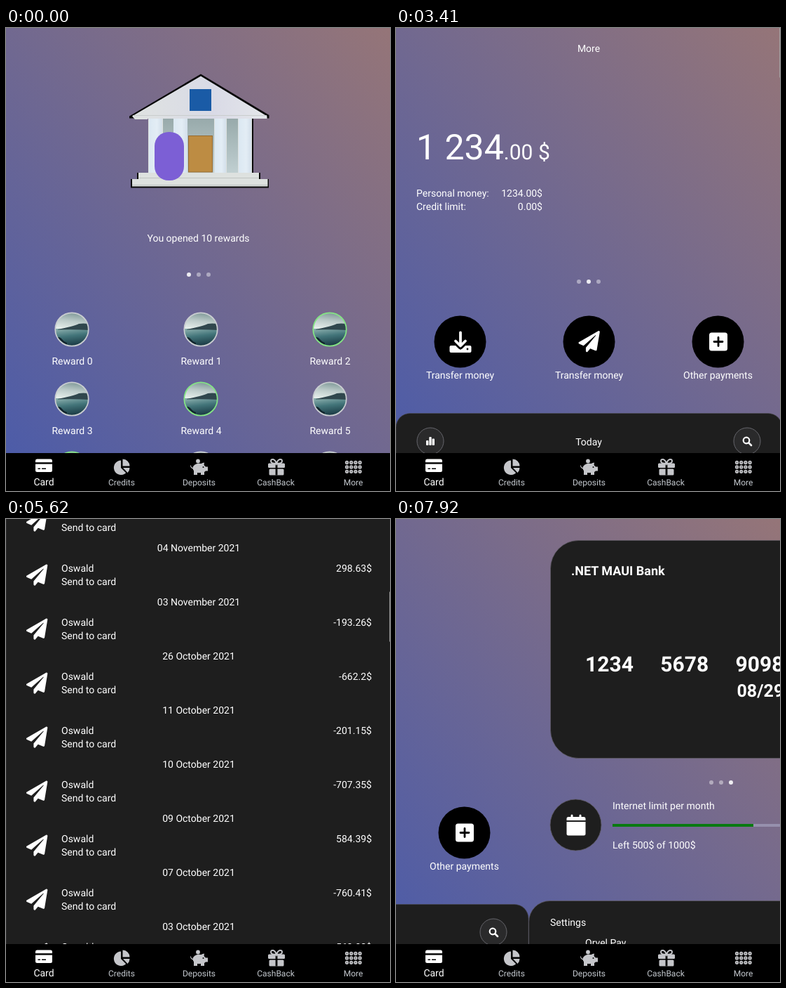
An HTML page that plays this animation: 548x659 px, repeating every 8 s.

```html
<!DOCTYPE html>
<html lang="en">
<head>
<meta charset="utf-8">
<title>Bank app</title>
<style>
  html, body { margin: 0; width: 100%; height: 100%; overflow: hidden; background: #000; }
  svg { display: block; width: 548px; height: 659px; }
  text { font: 14px Roboto, "Noto Sans", sans-serif; fill: #fff; white-space: pre; text-rendering: geometricPrecision; }
</style>
</head>
<body>
<svg id="stage" viewBox="0 0 548 659" xmlns="http://www.w3.org/2000/svg">
  <defs>
    <linearGradient id="bg" x1="0" y1="1" x2="1" y2="0">
      <stop offset="0" stop-color="#4d5ca8"/><stop offset="1" stop-color="#957578"/>
    </linearGradient>
    <linearGradient id="roof">
      <stop offset="0" stop-color="#dfe3e1"/><stop offset=".6" stop-color="#d9dae6"/><stop offset="1" stop-color="#e4e6ea"/>
    </linearGradient>
    <linearGradient id="pillar">
      <stop offset="0" stop-color="#dbe8f2"/><stop offset=".6" stop-color="#e3edf5"/><stop offset="1" stop-color="#d3dfea"/>
    </linearGradient>
    <linearGradient id="pane" x2="0" y2="1">
      <stop offset="0" stop-color="#98aaab"/><stop offset="1" stop-color="#c0cfd1"/>
    </linearGradient>
    <linearGradient id="sky" x1=".35" y1="1" x2=".6" y2="0">
      <stop offset="0" stop-color="#e6eeeb"/><stop offset=".5" stop-color="#bccbc9"/><stop offset="1" stop-color="#7d9796"/>
    </linearGradient>
    <linearGradient id="sea" x1=".35" y1="0" x2=".6" y2="1">
      <stop offset="0" stop-color="#84a9a8"/><stop offset=".4" stop-color="#43757a"/><stop offset="1" stop-color="#16343e"/>
    </linearGradient>
    <clipPath id="disc"><circle r="23.5"/></clipPath>
    <g id="photo" clip-path="url(#disc)">
      <rect x="-24" y="-24" width="48" height="24" fill="url(#sky)"/>
      <rect x="-24" y="-1" width="48" height="25" fill="url(#sea)"/>
      <path d="M-20 0Q-10-2-2-4T10-8Q16-9 24-8V1Q8 0-20 .5Z" fill="#30474d"/>
      <path d="M-24 11Q-17 10-14 14T-7 19V24H-24Z" fill="#12262d"/>
    </g>
    <path id="plane" transform="scale(.0592)" fill="#fff" d="M476 3.2L12.5 270.6c-18.1 10.4-15.8 35.6 2.2 43.2L121 358.4l287.3-253.2c5.5-4.9 13.3 2.6 8.6 8.3L176 407v80.5c0 23.6 28.5 32.9 42.5 15.8L282 426l124.6 52.2c14.2 6 30.4-2.9 33-18.2l72-432C515 7.8 493.3-6.8 476 3.2z"/>
  </defs>
  <rect width="548" height="605" fill="url(#bg)"/>
  <g id="rewards"></g>
  <g id="account"></g>
  <g id="card"></g>
  <g id="tabs"></g>
</svg>
<script>
const PAGE = 551, LOOP = 8000, DARK = '#1e1e1e';
const $ = id => document.getElementById(id);

const text = (x, y, s, attrs = '') => `<text x="${x}" y="${y}" ${attrs}>${s}</text>`;
const mid = (x, y, s, attrs = '') => text(x, y, s, 'text-anchor="middle" ' + attrs);
const right = (x, y, s) => text(x, y, s, 'text-anchor="end"');
const size = (px, weight = 400) => `style="font-size:${px}px;font-weight:${weight}"`;
const rect = (x, y, w, h, fill, rx = 0, attrs = '') =>
  `<rect x="${x}" y="${y}" width="${w}" height="${h}" rx="${rx}" fill="${fill}" ${attrs}/>`;
const circle = (x, y, r, fill, attrs = '') => `<circle cx="${x}" cy="${y}" r="${r}" fill="${fill}" ${attrs}/>`;
const path = (d, fill, attrs = '') => `<path d="${d}" fill="${fill}" ${attrs}/>`;
const use = (id, x, y) => `<use href="#${id}" transform="translate(${x} ${y})"/>`;
const dots = (y, active) => [0, 1, 2].map(i =>
  circle(261 + i * 14, y, 3, '#fff', `opacity="${i === active ? .88 : .43}"`)).join('');

function building() {
  const stone = '#dde1df', ink = '#080808';
  const fills = (list, fill) => list.map(([x, w]) => rect(x, 129, w, 77, fill)).join('');
  return rect(203, 128, 150, 79, ink) + rect(203, 128, 148, 79, stone)
    + fills([[224, 15], [259, 38], [315, 16]], 'url(#pane)')
    + fills([[204, 19], [239, 20], [298, 16], [332, 18]], 'url(#pillar)')
    + rect(260.5, 153.5, 34, 51.5, '#bd8c43', 0, 'stroke="#966a30"')
    + rect(187, 206, 176, 10, ink) + rect(189, 206, 172, 9, stone)
    + rect(178, 215, 197, 12.5, ink) + rect(180, 215, 193.5, 10.5, stone)
    + path('M189 213.5H361M180 223.500H373', 'none', 'stroke="#c0c6c4"')
    + path('M176 128.500V125.500L278 65.500L375.500 124V128.500Z', ink)
    + path('M278 68.500L372.500 125.500V129H202V130H184L180 125.500Z', 'url(#roof)')
    + path('M181 124.500H372', 'none', 'stroke="#c9cdcd"')
    + rect(262, 87, 31, 31, '#1a5ba6')
    + rect(212, 148, 42, 69, '#7c5fd5', 20);
}

function rewards() {
  const opened = [2, 4, 6, 9, 10, 11, 13, 16, 18, 19, 21];
  let out = building() + mid(274.5, 304, 'You opened 10 rewards') + dots(351, 0);
  for (let i = 0; i < 24; i++) {
    const x = 94 + i % 3 * 184, y = 429 + Math.floor(i / 3) * 99;
    const ring = opened.includes(i) ? '#84e484' : '#c9cdd0';
    out += use('photo', x, y) + circle(x, y, 23.7, 'none', `stroke="${ring}" stroke-width="1.8"`)
      + mid(x + .5, y + 50, 'Reward ' + i);
  }
  return out;
}

const history = [
  ['25 November', '-270.98'], ['22 November', '-793.47'], ['20 November', '-981.88'],
  ['06 November', '408.57'], ['04 November', '298.63'], ['03 November', '-193.26'],
  ['26 October', '-662.2'], ['11 October', '-201.15'], ['10 October', '-707.35'],
  ['09 October', '584.39'], ['07 October', '-760.41'], ['03 October', '-569.08', '190.41'],
  ['01 October', '633.91'], ['21 September', '783.39'], ['12 September', '890.24']
];

function payments() {
  let y = 633, out = '';
  for (const [day, ...sums] of history) {
    out += mid(275, y, day + ' 2021');
    y += 29;
    for (const sum of sums) {
      out += use('plane', 29, y - 10.5) + text(79, y, 'Oswald') + text(79, y + 19, 'Send to card') + right(522, y, sum + '$');
      y += 58;
    }
    y -= 10;
  }
  return out;
}

function account() {
  const ring = 'stroke="#66666c"';
  const button = (x, label, icon) => circle(x, 446.5, 37, '#000') + icon + mid(x, 499, label);
  const tray = path('M78.5 452H85l4 4a4 4 0 0 0 6 0l4-4h6.500a2 2 0 0 1 2 2v6a2 2 0 0 1-2 2H78.500a2 2 0 0 1-2-2v-6a2 2 0 0 1 2-2z', '#fff')
    + path('M92 433.500V452M85 446L92 453L99 446', 'none', 'stroke="#000" stroke-width="7"')
    + path('M92 433.500V451M85 445.500L92 452.500L99 445.500', 'none', 'stroke="#fff" stroke-width="3.8" stroke-linecap="round" stroke-linejoin="round"')
    + circle(102, 457, 1.4, '#000');
  const plus = rect(447, 433.5, 26, 26, '#fff', 3.5)
    + path('M460 440.500V452.500M454 446.500H466', 'none', 'stroke="#000" stroke-width="2.8" stroke-linecap="round"');
  return mid(275, 34, 'More')
    + text(29, 186.5, '1 234<tspan style="font-size:30px">.00 $</tspan>', size(50))
    + text(29, 240, 'Personal money:') + right(209, 240, '1234.00$')
    + text(29, 259, 'Credit limit:') + right(209, 259, '0.00$')
    + dots(361, 1)
    + button(91.5, 'Transfer money', tray)
    + button(275.5, 'Transfer money', use('plane', 260.5, 431))
    + button(459.5, 'Other payments', plus)
    + rect(0, 548.5, PAGE, 1700, DARK, 20, 'stroke="#48484c" stroke-width=".6"')
    + circle(49, 588, 19, '#2a2a2b', ring)
    + rect(43, 587, 3.4, 7, '#fff', 1) + rect(47.3, 582, 3.4, 12, '#fff', 1) + rect(51.6, 584.5, 3.4, 9.5, '#fff', 1)
    + circle(501, 588, 19, '#2a2a2b', ring)
    + circle(500, 587, 4.3, 'none', 'stroke="#fff" stroke-width="2.2"')
    + path('M503.300 590.300L507 594', 'none', 'stroke="#fff" stroke-width="2.6" stroke-linecap="round"')
    + mid(275, 594, 'Today') + payments();
}

function card() {
  const line = 'stroke="#5d5a62" stroke-width=".8"';
  const digits = ['1234', '5678', '9098', '7654']
    .map((s, i) => text(81 + i * 107.3, 217, s, size(30, 700))).join('');
  return rect(31.5, 30.5, 489, 310, DARK, 40, line)
    + text(61, 80, '.NET MAUI Bank', size(18, 700)) + digits
    + text(297.5, 253, '08/29', size(25, 700)) + dots(375, 2)
    + circle(67.5, 435.5, 36.5, DARK, line)
    + path('M57 424h22a2.500 2.500 0 0 1 2.500 2.500V429h-27v-2.500A2.500 2.500 0 0 1 57 424zM54.500 431h27v17a2.500 2.500 0 0 1-2.500 2.500h-22a2.500 2.500 0 0 1-2.500-2.500z', '#fff')
    + path('M62 422V426M74 422V426', 'none', 'stroke="#fff" stroke-width="3" stroke-linecap="round"')
    + text(120, 413, 'Internet limit per month')
    + rect(120, 434, 402, 4, '#9690ad') + rect(120, 434, 201, 4, '#087a10')
    + text(120, 469, 'Left 500$ of 1000$')
    + rect(.5, 543.5, PAGE - 1, 900, DARK, 30, line)
    + text(31, 579, 'Settings') + text(81, 608, 'Orvel Pay');
}

function tabs() {
  const tone = '#c5c6ca';
  let grid = '';
  for (let i = 0; i < 12; i++)
    grid += circle(486.5 + i % 4 * 6.2, 618.5 + Math.floor(i / 4) * 6.4, 1.9, '#777', `stroke="${tone}" stroke-width="1.5"`);
  const pay = rect(42, 613.5, 24, 18.5, '#fff', 2.5) + rect(42, 618.2, 24, 2.4, '#000')
    + rect(45.5, 626.5, 3.5, 1.5, '#000') + rect(51, 626.5, 6, 1.5, '#000');
  const pie = path('M164 615.500V626L171.200 633.300A10.300 10.300 0 1 1 164 615.500zM166.500 613.500a10 10 0 0 1 10 10h-10zM167 626h9.500a10 10 0 0 1-3 7z', tone);
  const pig = circle(274, 616.5, 2.9, tone) + `<ellipse cx="275.500" cy="626.500" rx="9" ry="6.800" fill="${tone}"/>`
    + path('M268 629h5v7h-5zM278 629h5v7h-5zM277 621q3-2.500 6-2.500l-.500 4 2.500 2h3v6h-3l-4 3zM264 622.500q0 3 3 3.500v1.500q-4-1-4-5z', tone)
    + circle(281.5, 625, 1, '#000');
  const gift = rect(374, 619.5, 24, 6.5, tone, 1.5) + rect(375.5, 627.5, 21, 9, tone, 1.5)
    + rect(384.6, 621.5, 2.8, 15, '#000')
    + path('M386 620q-8 0-8-3.500 0-3 3.200-2.500 3 .500 4.800 6 1.800-5.500 4.800-6 3.200-.500 3.200 2.500 0 3.500-8 3.500z', 'none', `stroke="${tone}" stroke-width="2"`);
  const label = (x, s) => mid(x, 651, s, 'style="font-size:12px;fill:#c3c8ce"');
  return rect(0, 605, 548, 54, '#000') + pay + pie + pig + gift + grid
    + mid(54, 651, 'Card') + label(165, 'Credits') + label(275.5, 'Deposits') + label(385, 'CashBack') + label(495.5, 'More');
}

$('rewards').innerHTML = rewards();
$('account').innerHTML = account();
$('card').innerHTML = card();
$('tabs').innerHTML = tabs();

const bar = document.createElementNS('http://www.w3.org/2000/svg', 'rect');
for (const [k, v] of Object.entries({ x: 547, width: 4, height: 71, fill: '#aaa', opacity: .8 })) bar.setAttribute(k, v);
$('stage').insertBefore(bar, $('tabs'));

// The screen refreshes in hard steps: [start, swipe x, scroll y]
const steps = [
  [0, 0, 0], [1000, 0, 130], [1200, 0, 360], [1400, 0, 521], [1620, 0, 540], [1820, 0, 330], [2020, 0, 1], [2210, 0, 0],
  [3210, 300, 0], [3410, PAGE, 0], [4410, PAGE, 60], [4610, PAGE, 200], [4810, PAGE, 400], [5010, PAGE, 578],
  [5210, PAGE, 680], [5410, PAGE, 785], [5620, PAGE, 895], [5820, PAGE, 1000], [6010, PAGE, 1100], [6210, PAGE, 1191],
  [6710, PAGE, 350], [6920, PAGE, 0], [7920, PAGE + 362, 0]
];

function place(id, x, y) {
  const node = $(id);
  node.setAttribute('transform', `translate(${x} ${-y})`);
  node.style.display = Math.abs(x) < PAGE ? '' : 'none';
}

function draw(now) {
  const t = now % LOOP;
  const [, swipe, scroll] = steps.findLast(s => s[0] <= t);
  place('rewards', -swipe, scroll);
  place('account', PAGE - swipe, scroll);
  place('card', 2 * PAGE - swipe, 0);
  bar.setAttribute('y', scroll * .1163 - .5);
  bar.style.display = swipe === PAGE ? '' : 'none';
}

const start = performance.now();
function tick() {
  draw(performance.now() - start);
  requestAnimationFrame(tick);
}
tick();
</script>
</body>
</html>
```
